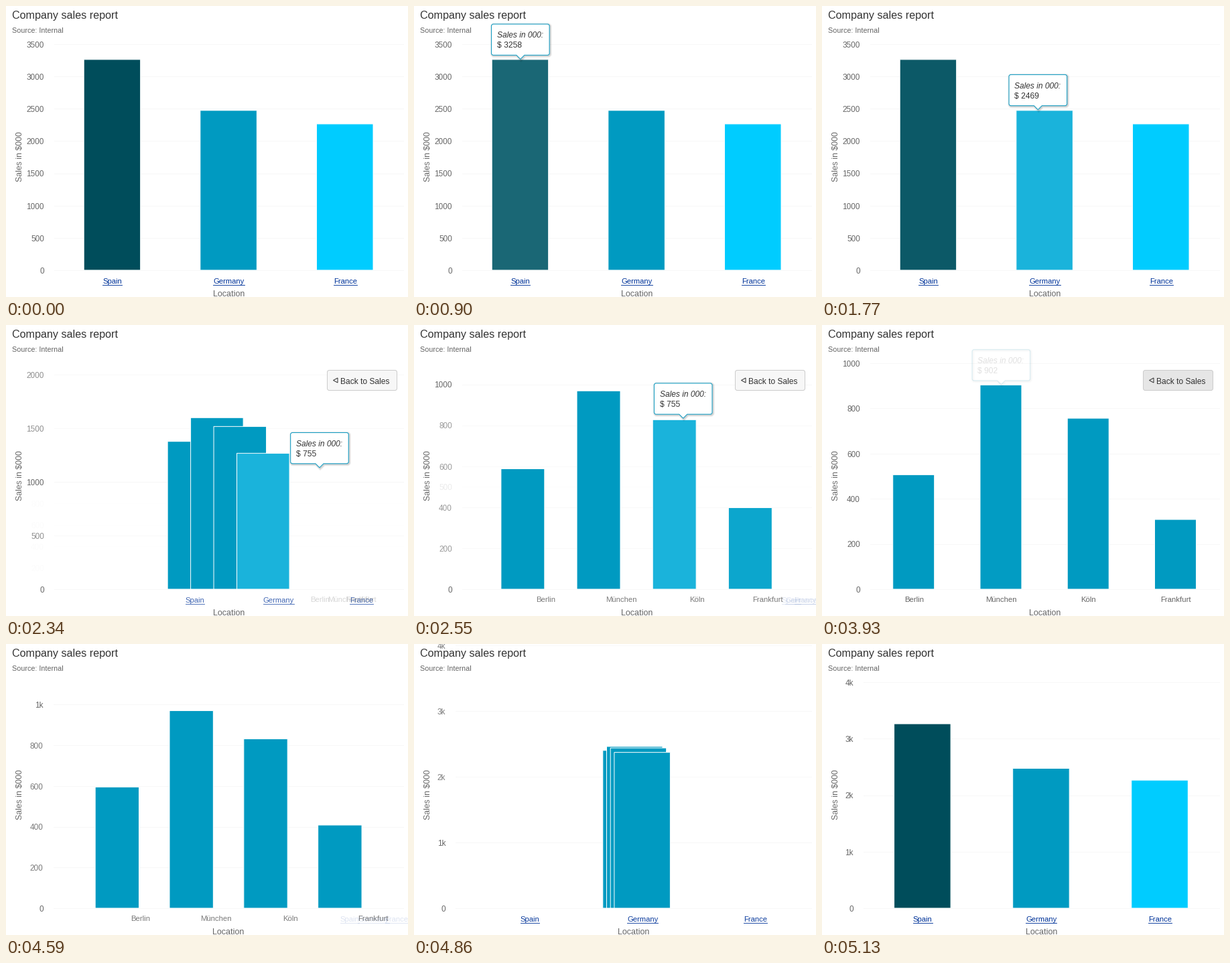
These frames come from a looping animation (600x434 px, 5.43 s). A matplotlib script:

```python
import math

import matplotlib.pyplot as plt
from matplotlib.animation import FuncAnimation
from matplotlib.colors import to_rgb
from matplotlib.patches import FancyBboxPatch, PathPatch, Polygon, Rectangle
from matplotlib.path import Path

W, H, DPI = 600, 434, 64
STEP, FRAMES = 30, 181
PT = 72 / DPI
BASE, PLOT_H, RIGHT = 394, 337, 593

DRILL_DOWN, DRILL_UP, MERGED = 2190, 4470, 4925
COUNTRIES = {"Spain": (3258, "#004d5b"), "Germany": (2469, "#009ac1"), "France": (2260, "#00ccff")}
CITIES = {"Berlin": 505, "München": 902, "Köln": 755, "Frankfurt": 307}
GREY, DARK, LINK = "#666666", "#333333", "#003399"

# Hover intervals per bar, in ms
HOVER = {
    "Spain": (840, 1560),
    "Germany": (1560, 2190),
    "Frankfurt": (2190, 2340),
    "Köln": (2370, 2730),
    "München": (2730, 3600),
}

fig = plt.figure(figsize=(W / DPI, H / DPI), dpi=DPI, facecolor="white")
ax = fig.add_axes([0, 0, 1, 1])


def clamp(v):
    return min(1.0, max(0.0, v))


def lerp(a, b, p):
    return a + (b - a) * p


def ease(t, start, duration):
    return (1 - math.cos(math.pi * clamp((t - start) / duration))) / 2


def centers(left, count):
    pitch = (RIGHT - left) / count
    return [left + pitch * (i + 0.5) for i in range(count)]


def top_of(value, axis_max):
    return BASE - value * PLOT_H / axis_max


def hover_level(name, t):
    if name not in HOVER:
        return 0
    on, off = HOVER[name]
    if t < off:
        return clamp((t - on + 30) / 90)
    return 1 - ease(t, off, 400)


def brighten(color, level):
    return tuple(min(1, c + 0.1 * level) for c in to_rgb(color))


# Drawing helpers

def label(x, y, text, size, color=GREY, alpha=1.0, ha="center", z=5, **kw):
    """Text whose capitals are centred on y."""
    return ax.text(x, y + 0.36 * size - 0.4, text, fontsize=size * PT, color=color, alpha=alpha,
                   ha=ha, va="baseline", zorder=z, family="Liberation Sans", **kw)


def link(x, y, text, alpha):
    box = label(x, y, text, 11.2, LINK, alpha).get_window_extent()
    ax.plot([box.x0, box.x1], [y + 5.5] * 2, color=LINK, lw=0.9 * PT, alpha=alpha, zorder=5)


def bar(x, width, top, color, alpha=1.0):
    ax.add_patch(Rectangle((x - width / 2 - 0.4, top - 0.5), width, BASE + 0.5 - top, fc=color,
                           ec="white", lw=PT, alpha=alpha, zorder=3, snap=False))


def ticks(values, scale, left, kilo=False, alpha=1.0):
    for v in values:
        y = BASE - v * scale
        ax.plot([left, RIGHT], [y, y], color="#f7f7f7", lw=PT, alpha=alpha, zorder=1)
        text = f"{v // 1000}k" if kilo and v >= 1000 else str(v)
        label(left - 15, y + 1, text, 11.7, alpha=alpha, ha="right")


def blended_ticks(old, new, scale, left, p, kilo=False):
    ticks([v for v in old if v in new], scale, left, kilo)
    ticks([v for v in new if v not in old], scale, left, kilo, p ** 3)
    if p < 0.9:
        ticks([v for v in old if v not in new], scale, left, kilo, 1 - p)


def button(hovered):
    ax.add_patch(FancyBboxPatch((479.5, 67.5), 104, 30, boxstyle="round,pad=0,rounding_size=3",
                                fc="#e6e6e6" if hovered else "#f7f7f7", ec="#cccccc", lw=PT, zorder=6))
    ax.add_patch(Polygon([(488.5, 82.5), (495, 79), (495, 86)], fc="none", ec=DARK, lw=PT, zorder=7))
    label(499.3, 83.7, "Back to Sales", 12, DARK, ha="left", z=7)


def bubble(x, y):
    l, r, t, b, k = x - 43.3, x + 43.3, y - 53.3, y - 7, 3
    points = [(l + k, t), (r - k, t), (r, t), (r, t + k), (r, b - k), (r, b), (r - k, b),
              (x + 6, b), (x, b + 6), (x - 6, b), (l + k, b), (l, b), (l, b - k),
              (l, t + k), (l, t), (l + k, t), (l + k, t)]
    M, L, C = Path.MOVETO, Path.LINETO, Path.CURVE3
    return Path(points, [M, L, C, C, L, C, C, L, L, L, L, C, C, L, C, C, Path.CLOSEPOLY])


def tooltip(x, y, value, alpha):
    for width in (5, 3, 1):
        ax.add_patch(PathPatch(bubble(x + 1, y + 1), fc="none", ec="black", lw=width * PT,
                               alpha=0.07 * alpha, zorder=8))
    ax.add_patch(PathPatch(bubble(x, y), fc="white", ec="#1a9fc4", lw=1.1 * PT, alpha=alpha, zorder=9))
    label(x - 35, y - 36.8, "Sales in 000:", 12, DARK, alpha, "left", 10, style="italic")
    label(x - 35, y - 22, f"\\$ {value}", 12, DARK, alpha, "left", 10)


# Tooltip path: each frame covers a third of the way in x and half in y

WIDE, NARROW = 72, 61.7
COUNTRY_X, CITY_X, COUNTRY_X_END = centers(WIDE, 3), centers(WIDE, 4), centers(NARROW, 3)
GERMANY_TOP = top_of(2469, 3500)
STOPS = [
    (840, COUNTRY_X[0], top_of(3258, 3500), 3258),
    (1560, COUNTRY_X[1], GERMANY_TOP, 2469),
    (2250, 525, 222, 307),
    (2340, CITY_X[2], top_of(755, 1000), 755),
    (2700, CITY_X[1], top_of(902, 1000), 902),
]


def tooltip_path():
    x, y = STOPS[0][1:3]
    path = []
    for i in range(FRAMES):
        _, tx, ty, _ = [s for s in STOPS if s[0] < i * STEP or s is STOPS[0]][-1]
        x = tx if abs(tx - x) < 4 else x + (tx - x) / 3
        y = ty if abs(ty - y) < 1 else y + (ty - y) / 2
        path.append((x, y))
    return path


TOOLTIP_PATH = tooltip_path()


# Scenes

def city_bars(t, p):
    """City columns spreading out of the Germany column as p goes from 0 to 1."""
    for x, (name, value) in zip(CITY_X, CITIES.items()):
        color = brighten(COUNTRIES["Germany"][1], hover_level(name, t))
        bar(lerp(COUNTRY_X[1], x, p), lerp(84.5, 62, p),
            lerp(GERMANY_TOP, top_of(value, 1000), p), color)


def overview(t):
    ticks(range(0, 3501, 500), PLOT_H / 3500, WIDE)
    for x, (name, (value, color)) in zip(COUNTRY_X, COUNTRIES.items()):
        bar(x, 84.5, top_of(value, 3500), brighten(color, hover_level(name, t)))
        link(x, 410, name, 1)


def drilled(t):
    p = ease(t, 2168, 500)
    scale = lerp(PLOT_H / 3500, PLOT_H / 1000, p)
    blended_ticks(range(0, 3501, 500), range(0, 1001, 200), scale, WIDE, p)
    city_bars(t, p)
    if p < 1:
        for x, end, name in zip(COUNTRY_X, (624, 614, 597), COUNTRIES):
            link(lerp(x, end, p), 410, name, 1 - p)
    for start, x, name in zip((588, 588, 588, 530), CITY_X, CITIES):
        label(lerp(start, x, p), 409, name, 11.4, alpha=p)
    button(t >= 3780)


def returning(t):
    p = ease(t, 4486, 440)
    left = lerp(WIDE, NARROW, p)
    scale = lerp(PLOT_H / 1000, PLOT_H / 4000, p)
    blended_ticks(range(0, 1001, 200), range(0, 4001, 1000), scale, left, p, kilo=True)
    if t < MERGED:
        city_bars(t, 1 - ease(t, 4479, 440))
    else:
        for x, (name, (value, color)) in zip(COUNTRY_X_END, COUNTRIES.items()):
            alpha = 1 if name == "Germany" else clamp((t - 4910) / 200)
            bar(x, 84.5, top_of(value, 4000), color, alpha)
    if p < 0.9:
        for x, end, name in zip(CITY_X, (620, 614, 605, 682), CITIES):
            label(lerp(x, end, p), 409, name, 11.4, alpha=1 - p)
    for start, x, name in zip((568, 582, 595), COUNTRY_X_END, COUNTRIES):
        link(lerp(start, x, p), 410, name, p)


def draw(i):
    t = i * STEP
    ax.cla()
    ax.set(xlim=(0, W), ylim=(H, 0))
    ax.axis("off")

    label(8.7, 14, "Company sales report", 16.1, DARK, ha="left")
    label(9, 37, "Source: Internal", 10.8, ha="left")
    ax.text(21, 225, "Sales in \\$000", fontsize=12.2 * PT, color=GREY, rotation=90,
            ha="center", va="center", family="Liberation Sans")
    label(lerp(332.4, 327.3, ease(t, 4486, 440)), 428.5, "Location", 12.5)

    if t < DRILL_DOWN:
        overview(t)
    elif t < DRILL_UP:
        drilled(t)
    else:
        returning(t)

    alpha = 1 - clamp((t - 3590) / 400)
    if t >= STOPS[0][0] and alpha > 0:
        value = [s[3] for s in STOPS if s[0] <= t][-1]
        tooltip(*TOOLTIP_PATH[i], value, alpha)
    return []


anim = FuncAnimation(fig, draw, frames=FRAMES, interval=STEP, init_func=lambda: [],
                     repeat=True, repeat_delay=0)
plt.show()
```
